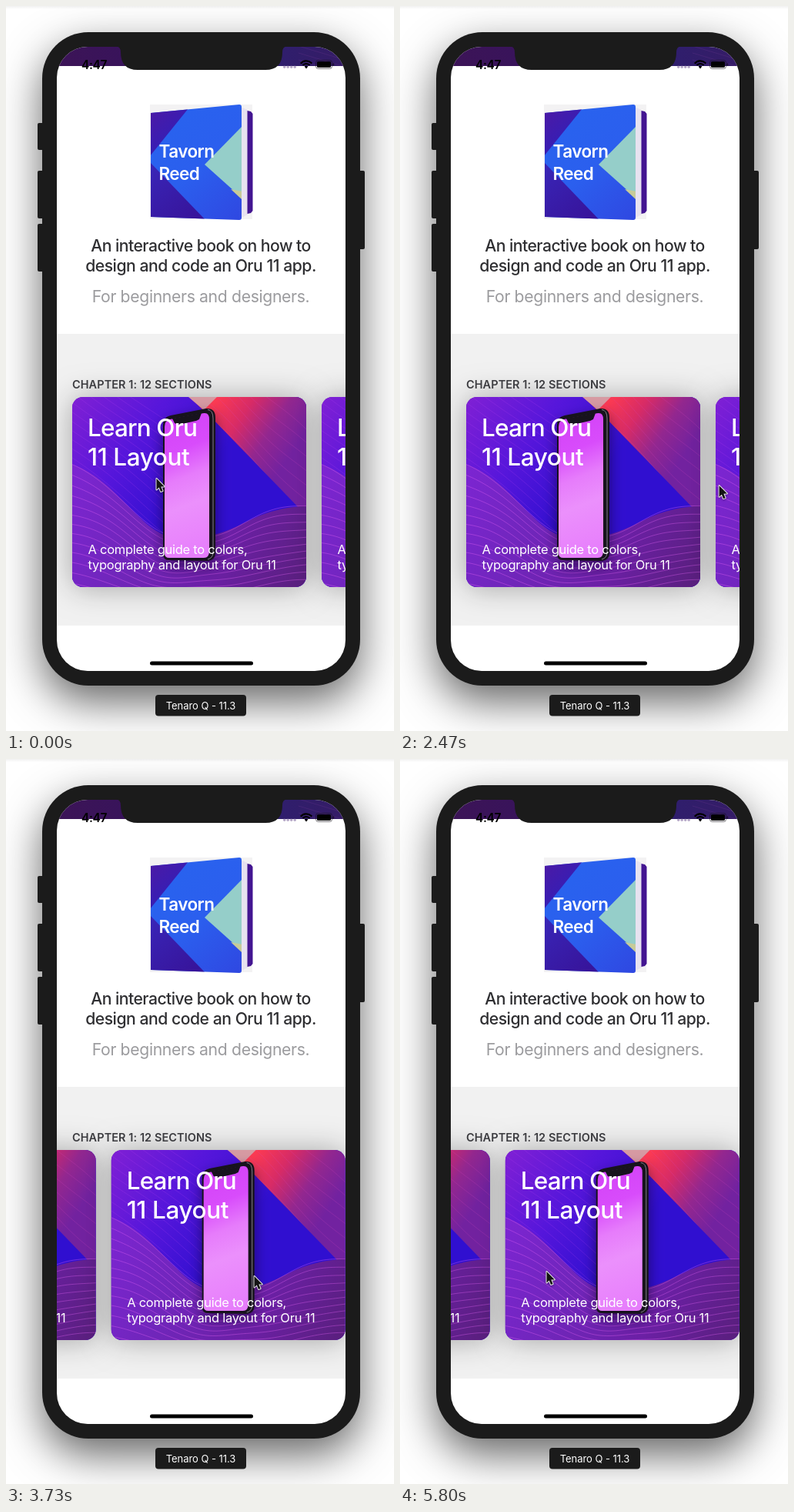
Animation, 504 px wide and 942 px high, one loop 6.27 s. Source, as an HTML page with a canvas:

```html
<!DOCTYPE html>
<html lang="en">
<head>
<meta charset="utf-8">
<title>Card carousel</title>
<style>
html, body { margin: 0; width: 100%; height: 100%; overflow: hidden; background: #fff; }
canvas { display: block; width: 504px; height: 942px; }
</style>
</head>
<body>
<canvas id="stage"></canvas>
<script>
const W = 504, H = 942, LOOP = 6270, FPS = 15;
const FONT = 'Inter, "Liberation Sans", sans-serif';
const SCREEN = { x: 66, y: 53, w: 375, h: 811, r: 40 };
const CARD = { x: 86, y: 508, w: 304, h: 247, r: 14, step: 324 };
const END = -273;

const canvas = document.getElementById('stage');
const dpr = window.devicePixelRatio || 1;
canvas.width = W * dpr;
canvas.height = H * dpr;
const c = canvas.getContext('2d');

// Motion

function ease(t, from, to) {
  const u = Math.min(1, Math.max(0, (t - from) / (to - from)));
  return u * u * (3 - 2 * u);
}
const mix = (a, b, u) => a + (b - a) * u;
const rubber = x => SCREEN.w * (1 - 1 / (x * 0.55 / SCREEN.w + 1));
const pull = distance => Math.max(0, distance - 10);

function spring(ms) {
  const s = Math.max(0, ms) * 0.0109;
  return (1 + s) * Math.exp(-s);
}

function bound(x) {
  if (x > 0) return rubber(x);
  return x < END ? END - rubber(END - x) : x;
}

const dragRight = t => bound(pull(220 * ease(t, 370, 730)));
const dragLeft = t => bound(-pull(439 * ease(t, 2450, 3085)));
const dragPast = t => bound(END - pull(132 * ease(t, 3970, 4330)));

function scrollAt(t) {
  if (t < 1498) return dragRight(t);
  if (t < 2450) return dragRight(1498) * spring(t - 1498);
  if (t < 3041) return dragLeft(t);
  if (t < 3970) return END + (dragLeft(3041) - END) * spring(t - 3041);
  if (t < 5098) return dragPast(t);
  return END + (dragPast(5098) - END) * spring(t - 5098);
}

function cursorAt(t) {
  if (t < 2450) {
    const u = ease(t, 370, 730);
    return [mix(195, 415, u), mix(614, 623, u)];
  }
  if (t < 2790) {
    const u = ease(t, 2450, 3085);
    return [mix(415, -24, u), mix(623, 691, u)];
  }
  if (t < 3320) return null;
  if (t < 3970) {
    const u = ease(t, 3330, 3735);
    return [mix(0, 322, u), mix(691, 672, u)];
  }
  const u = ease(t, 3970, 4330);
  return [mix(322, 190, u), mix(672, 666, u)];
}

// Drawing helpers

function box(x, y, w, h, r, fill) {
  c.beginPath();
  c.roundRect(x, y, w, h, r);
  c.fillStyle = fill;
  c.fill();
}

function trace(points) {
  c.beginPath();
  for (let i = 0; i < points.length; i += 2) c.lineTo(points[i], points[i + 1]);
  c.closePath();
}

function poly(points, fill) {
  trace(points);
  c.fillStyle = fill;
  c.fill();
}

function gradient(x0, y0, x1, y1, ...colors) {
  const g = c.createLinearGradient(x0, y0, x1, y1);
  colors.forEach((color, i) => g.addColorStop(i / (colors.length - 1), color));
  return g;
}

function text(str, x, y, size, weight, color, tracking = 0, align = 'left') {
  c.font = `${weight} ${size}px ${FONT}`;
  c.letterSpacing = tracking + 'px';
  c.textAlign = align;
  c.fillStyle = color;
  c.fillText(str, x, y);
}

function shadow(color, blur, dy) {
  c.shadowColor = color;
  c.shadowBlur = blur * dpr;
  c.shadowOffsetY = dy * dpr;
}
const noShadow = () => shadow('transparent', 0, 0);

function curve(fn, from, to, color, width = 0.8) {
  c.beginPath();
  for (let x = from; x <= to; x += 4) c.lineTo(x, fn(x));
  c.strokeStyle = color;
  c.lineWidth = width;
  c.stroke();
}

// Scene parts

function body() {
  box(0, 0, W, H, 0, '#fff');
  box(0, 0, W, 4, 0, gradient(0, 0, 0, 4, '#f1f1f1', '#fff'));
  shadow('rgba(0,0,0,.6)', 54, 21);
  box(47, 34, 413, 849, 60, '#1b1b1b');
  noShadow();
  for (const [y, h] of [[152, 35], [214, 62], [283, 62]]) box(41, y, 8, h, 2, '#1b1b1b');
  box(458, 214, 8, 102, 2, '#1b1b1b');
}

function statusBar() {
  c.save();
  c.beginPath();
  c.rect(66, 53, 375, 25);
  c.clip();
  box(66, 53, 375, 25, 0, gradient(66, 0, 441, 0, '#3c1457', '#37135c', '#2d1f70', '#351c66'));
  for (let i = 0; i < 4; i++) {
    curve(x => 52 + i * 9 + (x - 380) * 0.3, 380, 441, 'rgba(120,60,150,.3)');
  }
  c.restore();
  text('4:47', 98, 81.5, 15.5, 600, '#000', -0.35);
  for (let i = 0; i < 4; i++) box(360 + i * 4.5, 77.5, 3.4, 3.4, 1.7, 'rgba(150,130,175,.7)');
  c.strokeStyle = '#000';
  c.lineWidth = 2.2;
  for (const r of [9.6, 6]) {
    c.beginPath();
    c.arc(390, 81, r, -Math.PI * 0.77, -Math.PI * 0.23);
    c.stroke();
  }
  poly([390, 81.5, 387.6, 78.6, 390, 77.4, 392.4, 78.6], '#000');
  c.beginPath();
  c.roundRect(402.5, 70.5, 21, 11, 3);
  c.strokeStyle = 'rgba(20,15,25,.55)';
  c.lineWidth = 1;
  c.stroke();
  box(404, 72, 18, 8, 1.6, '#000');
  box(424.6, 74, 1.5, 4, 1, 'rgba(0,0,0,.5)');
}

function notch() {
  c.beginPath();
  c.moveTo(143, 52);
  c.quadraticCurveTo(149, 53, 149, 60);
  c.quadraticCurveTo(149, 83, 171, 83);
  c.lineTo(337, 83);
  c.quadraticCurveTo(359, 83, 359, 60);
  c.quadraticCurveTo(359, 53, 365, 52);
  c.fillStyle = '#1b1b1b';
  c.fill();
}

function book() {
  box(187, 128, 133, 149, 0, '#f3f2f3');
  poly([304, 131, 314, 135, 314, 271, 304, 276], '#e7e2f0');
  poly([313.5, 136, 318, 137, 320.5, 140, 320.5, 266, 318, 269, 313.5, 270], '#431591');
  c.save();
  c.beginPath();
  c.moveTo(188, 139);
  c.lineTo(303, 128);
  c.quadraticCurveTo(306, 128, 306, 131);
  c.lineTo(306, 275);
  c.quadraticCurveTo(306, 278, 303, 278);
  c.lineTo(188, 274);
  c.closePath();
  c.clip();
  box(187, 127, 120, 152, 0, gradient(188, 150, 306, 270, '#2863ee', '#2b5fee', '#2f49e2'));
  poly([187, 136, 237, 133, 187, 195], gradient(188, 139, 212, 164, '#4a1aa6', '#3a1db2'));
  poly([187, 203, 260, 279, 187, 279], gradient(188, 215, 240, 278, '#3924b5', '#37149b'));
  poly([258, 206, 307, 156, 307, 250], '#95cec9');
  poly([292, 238, 307, 241, 307, 252], '#c7cb99');
  c.restore();
  text('Tavorn', 198.5, 196.5, 22.5, 600, '#fff', -0.55);
  text('Reed', 198.5, 226, 22.5, 600, '#fff', -0.55);
}

function intro() {
  text('An interactive book on how to', 253, 319, 21.2, 500, '#2f2f32', -0.54, 'center');
  text('design and code an Oru 11 app.', 253, 345, 21.2, 500, '#2f2f32', -0.5, 'center');
  text('For beginners and designers.', 253, 385, 21.2, 400, '#9b9b9e', -0.35, 'center');
}

// Valley on the left, gentle hill on the right
function wave(x, depth = 1) {
  const valley = 100 * Math.exp(-(((x - 130) / 85) ** 2));
  const hill = 62 / (1 + Math.exp((180 - x) / 20));
  return 78 + (valley + hill) * depth;
}

function artwork() {
  const { w, h } = CARD;
  box(0, 0, w, h, 0, gradient(0, 0, 160, 120, '#8020d4', '#5616db', '#300fd0'));
  for (let i = 0; i < 12; i++) {
    curve(x => i * 13 - 62 + x * 0.78 + 4 * Math.sin(x / 32 + i / 3), 0, 180, 'rgba(180,70,240,.28)');
  }

  // Warm slope
  const slope = [152, 0, w, 0, w, 154, 184, 30];
  poly(slope, gradient(190, 0, 290, 66, '#fb3a52', '#d72b66', '#93278f', '#7222a0'));
  c.save();
  trace(slope);
  c.clip();
  for (let i = 0; i < 14; i++) {
    curve(x => 150 - i * 17 + (x - 180) * 0.95 + 5 * Math.sin(x / 25 + i * 0.4), 174, w + 6, 'rgba(215,75,190,.28)');
  }
  c.restore();
  poly([151, 0, 188, 0, 171, 17], '#d69aa2');

  // Lower wave
  c.beginPath();
  c.moveTo(0, h);
  for (let x = 0; x <= w; x += 4) c.lineTo(x, wave(x));
  c.lineTo(w, h);
  c.closePath();
  c.fillStyle = gradient(0, 90, w, 240, '#7c25d2', '#7026bb', '#6b20a5', '#591f7d');
  c.fill();
  for (let i = 0; i < 13; i++) {
    curve(x => wave(x, 1 - i / 17) + i * 13.5 + 2 * Math.sin(x / 24 + i * 0.5), 0, w + 6, 'rgba(232,102,245,.45)');
  }
}

function handset() {
  shadow('rgba(20,0,50,.6)', 18, 8);
  c.beginPath();
  c.moveTo(118, 36);
  c.quadraticCurveTo(118, 26, 128, 24);
  c.lineTo(174, 15);
  c.quadraticCurveTo(186, 14, 186, 27);
  c.lineTo(186, 203);
  c.quadraticCurveTo(186, 212, 176, 213);
  c.lineTo(125, 212);
  c.quadraticCurveTo(118, 212, 118, 203);
  c.closePath();
  c.fillStyle = '#17131d';
  c.fill();
  noShadow();
  c.beginPath();
  c.moveTo(176, 16.5);
  c.quadraticCurveTo(183, 17, 183, 28);
  c.lineTo(183, 202);
  c.quadraticCurveTo(183, 209, 176, 211);
  c.strokeStyle = '#857f8a';
  c.lineWidth = 1;
  c.stroke();
  c.beginPath();
  c.moveTo(120, 39);
  c.quadraticCurveTo(120, 31, 127, 29);
  c.lineTo(171, 21);
  c.quadraticCurveTo(178, 20, 178, 29);
  c.lineTo(178, 200);
  c.quadraticCurveTo(178, 209, 171, 209);
  c.lineTo(126, 209);
  c.quadraticCurveTo(120, 209, 120, 203);
  c.closePath();
  c.fillStyle = gradient(115, 40, 180, 205, '#d444f8', '#d84cfb', '#e67cfb', '#eb90fc', '#e986fc', '#e57cfb');
  c.fill();
  poly([130, 28, 168, 21, 165, 29, 161, 31, 138, 36, 133, 34], '#17131d');
}

function card(x) {
  const { y, w, h, r } = CARD;
  shadow('rgba(0,0,0,.32)', 38, 1);
  box(x, y, w, h, r, '#6522b4');
  noShadow();
  c.save();
  c.translate(x, y);
  c.beginPath();
  c.roundRect(0, 0, w, h, r);
  c.clip();
  artwork();
  handset();
  text('Learn Oru', 20, 51, 31.5, 500, '#fff', -0.85);
  text('11 Layout', 20, 89, 31.5, 500, '#fff', -0.4);
  text('A complete guide to colors,', 20.5, 203.5, 16.5, 400, '#fff', -0.26);
  text('typography and layout for Oru 11', 20.5, 223.5, 16.5, 400, '#fff', -0.26);
  c.restore();
}

function pointer([x, y]) {
  c.save();
  c.translate(x, y);
  shadow('rgba(0,0,0,.35)', 3, 1);
  trace([0.5, 0, 0.5, 14.5, 3.8, 11.5, 6, 17, 8.6, 16, 6.3, 10.6, 10.8, 10.4]);
  c.lineJoin = 'round';
  c.lineWidth = 2;
  c.strokeStyle = '#e9e9e9';
  c.stroke();
  noShadow();
  c.fillStyle = '#141414';
  c.fill();
  c.restore();
}

function caption() {
  box(194, 895, 118, 27.5, 4, '#1b1b1b');
  text('Tenaro Q - 11.3', 253, 914, 13, 400, '#fff', -0.05, 'center');
}

function draw(t) {
  c.setTransform(dpr, 0, 0, dpr, 0, 0);
  body();
  c.save();
  c.beginPath();
  c.roundRect(SCREEN.x, SCREEN.y, SCREEN.w, SCREEN.h, SCREEN.r);
  c.clip();
  box(66, 53, 375, 811, 0, '#fff');
  box(66, 426, 375, 379, 0, '#f1f1f1');
  statusBar();
  book();
  intro();
  const x = CARD.x + scrollAt(t);
  card(x);
  card(x + CARD.step);
  text('CHAPTER 1: 12 SECTIONS', 86, 497, 14.5, 600, '#3c3c40', 0.06);
  box(187, 851.5, 134, 5, 2.5, '#000');
  c.restore();
  notch();
  caption();
  const tip = cursorAt(t);
  if (tip) pointer(tip);
}

const start = performance.now();
function tick() {
  const t = (performance.now() - start) % LOOP;
  draw(Math.floor((t + 7) * FPS / 1000) % 94 * 1000 / FPS);
  requestAnimationFrame(tick);
}
tick();
</script>
</body>
</html>
```
